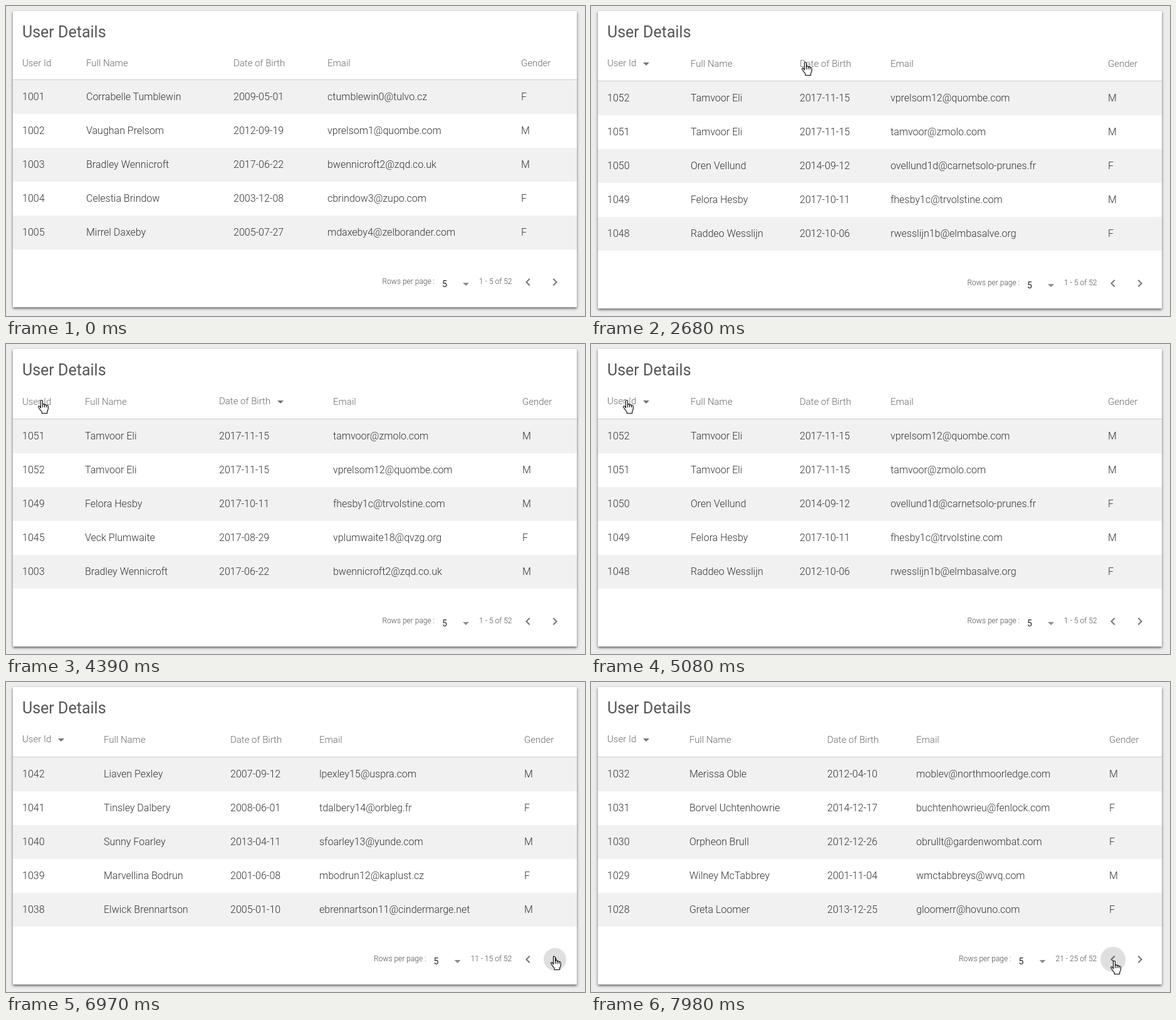
Animation of 924 by 494 pixels, one loop 8 s. Source, as an HTML page:

```html
<!DOCTYPE html>
<html lang="en">
<head>
<meta charset="utf-8">
<title>User Details</title>
<style>
  html, body { margin: 0; width: 100%; height: 100%; overflow: hidden; background: #ececec; }
  #card { position: absolute; left: 11px; top: 8px; width: 900px; background: #fff;
    box-shadow: 0 2px 4px rgba(0,0,0,.6); }
  svg { position: absolute; left: 0; top: 0; display: block; }
  text { font-family: Roboto, Arial, sans-serif; font-weight: 300; white-space: pre; }
  .title { font-size: 25px; font-weight: 400; fill: #555; }
  .head { font-size: 15px; fill: #6a6a6a; }
  .cell { font-size: 16px; fill: #333; }
  .foot { font-size: 12px; fill: #4c4c4c; }
  .size { font-size: 14px; font-weight: 400; fill: #222; }
  .icon { fill: #757575; }
  .drop { fill: #8c8c8c; }
  .cursor { fill: #fff; stroke: #000; stroke-width: 1.1; stroke-linejoin: round; }
</style>
</head>
<body>
<div id="card"></div>
<svg id="stage" width="924" height="494" viewBox="0 0 924 494"></svg>
<script>
const LOOP = 8000;
const stage = document.getElementById('stage');
const card = document.getElementById('card');

function set(node, attrs) {
  for (const key in attrs) node.setAttribute(key, attrs[key]);
}
function add(tag, attrs, parent = stage) {
  const node = document.createElementNS('http://www.w3.org/2000/svg', tag);
  set(node, attrs);
  return parent.appendChild(node);
}
function show(node, visible) {
  node.style.display = visible ? '' : 'none';
}
function label(cls, x, y, text, parent) {
  const node = add('text', { class: cls, x, y }, parent);
  node.textContent = text;
  return node;
}
function write(node, x, y, text) {
  set(node, { x, y });
  if (node.textContent !== text) node.textContent = text;
}

// name | date of birth | mail domain | gender | mail user, if not built from the name
const users = {
  1001: 'Corrabelle Tumblewin|2009-05-01|tulvo.cz|F',
  1002: 'Vaughan Prelsom|2012-09-19|quombe.com|M',
  1003: 'Bradley Wennicroft|2017-06-22|zqd.co.uk|M',
  1004: 'Celestia Brindow|2003-12-08|zupo.com|F',
  1005: 'Mirrel Daxeby|2005-07-27|zelborander.com|F',
  1014: 'Torvin Ashmell|2000-02-13|brindlo.org|M',
  1021: 'Pellina Crowdest|2001-03-17|wexlode.com|F',
  1023: 'Harvick Osmey|2008-10-02|tarnbel.com|M',
  1024: 'Lunetta Prask|2015-04-23|quorvine.net|F',
  1025: 'Fenwell Garbry|2004-01-19|mosdale.org|M',
  1026: 'Ottiline Weyburst|2011-08-30|plovander.com|F',
  1027: 'Jorrick Tansome|2016-05-11|elkvane.com|M',
  1028: 'Greta Loomer|2013-12-25|hovuno.com|F',
  1029: 'Wilney McTabbrey|2001-11-04|wvq.com|M',
  1030: 'Orpheon Brull|2012-12-26|gardenwombat.com|F',
  1031: 'Borvel Uchtenhowrie|2014-12-17|fenlock.com|F',
  1032: 'Merissa Oble|2012-04-10|northmoorledge.com|M',
  1033: 'Dorvan Hislewick|2010-03-05|umberlo.com|M',
  1034: 'Sabrille Tenning|2006-11-21|cravenol.net|F',
  1035: 'Nolvin Arkhurst|2014-07-16|pelstow.org|M',
  1036: 'Willamina Drosk|2009-09-09|varnquist.com|F',
  1037: 'Emmerel Fosby|2000-09-28|jundlow.com|F',
  1038: 'Elwick Brennartson|2005-01-10|cindermarge.net|M',
  1039: 'Marvellina Bodrun|2001-06-08|kaplust.cz|F',
  1040: 'Sunny Foarley|2013-04-11|yunde.com|M',
  1041: 'Tinsley Dalbery|2008-06-01|orbleg.fr|F',
  1042: 'Liaven Pexley|2007-09-12|uspra.com|M',
  1043: 'Corwin Ballisk|2011-02-14|hestrow.com|M',
  1044: 'Annelby Trufold|2006-08-07|mirvane.org|F',
  1045: 'Veck Plumwaite|2017-08-29|qvzg.org|F',
  1046: 'Rosmund Ackerly|2010-12-03|dorlunde.com|M',
  1047: 'Isolde Farnwick|2015-05-20|plenqua.net|F',
  1048: 'Raddeo Wesslijn|2012-10-06|elmbasalve.org|F',
  1049: 'Felora Hesby|2017-10-11|trvolstine.com|M',
  1050: 'Oren Vellund|2014-09-12|carnetsolo-prunes.fr|F',
  1051: 'Tamvoor Eli|2017-11-15|zmolo.com|M|tamvoor',
  1052: 'Tamvoor Eli|2017-11-15|quombe.com|M|vprelsom12'
};

function rowOf(id) {
  const [name, born, domain, gender, user] = users[id].split('|');
  const [first, last] = name.toLowerCase().split(' ');
  const account = user || first[0] + last + (id - 1001).toString(36);
  return [String(id), name, born, account + '@' + domain, gender];
}
const run = (from, step) => Array.from({ length: 5 }, (_, i) => from + i * step);

// sort: [column, direction]; cols: left edges of the last four columns
const byIdUp = { ids: run(1001, 1), cols: [158, 384, 528, 825], sort: [0, 1] };
const byIdDown = { ids: run(1052, -1), cols: [159, 333, 478, 825], sort: [0, -1] };
const page = (n, cols) => ({ ids: run(1057 - 5 * n, -1), cols, sort: [0, -1], page: n });
const page5 = page(5, [157, 377, 519, 827]);

const views = [
  [0, { ids: run(1001, 1), cols: [128, 363, 513, 822] }],
  [1160, byIdUp],
  [1820, byIdDown],
  [2910, { ids: [1014, 1037, 1021, 1039, 1029], cols: [126, 345, 525, 824], sort: [2, 1] }],
  [3590, { ids: [1051, 1052, 1049, 1045, 1003], cols: [126, 340, 522, 824], sort: [2, -1] }],
  [4570, byIdUp],
  [5040, byIdDown],
  [6300, page(2, [157, 354, 498, 826])],
  [6600, page(3, [156, 358, 500, 827])],
  [7020, page(4, [157, 362, 505, 827])],
  [7220, page5],
  [7400, page(6, [157, 370, 512, 828])],
  [7960, page5]
];

// time, x, y of the pointer tip
const track = [
  [210, 155, 302], [330, 104, 188], [470, 46, 62], [560, 32, 20], [700, 57, 93],
  [1880, 57, 93], [2040, 140, 97], [2280, 308, 92], [2420, 308, 92], [2450, 325, 91],
  [2640, 325, 91], [2680, 342, 89], [3050, 342, 89], [3080, 347, 89],
  [3990, 347, 89], [4190, 190, 97], [4390, 57, 89],
  [5400, 57, 89], [5600, 240, 165], [5900, 690, 360], [6130, 875, 437],
  [7440, 875, 437], [7570, 835, 444]
];

// time, button (0 none, 1 previous, 2 next), radius
const ripples = [
  [0, 0, 0], [6220, 2, 9], [6260, 2, 14], [6300, 2, 18], [6340, 2, 20],
  [6570, 2, 18], [6600, 2, 20], [6790, 2, 17], [6970, 2, 18], [7020, 2, 20],
  [7180, 2, 18], [7220, 2, 20], [7480, 0, 0], [7930, 1, 16], [7960, 1, 20]
];

const last = (list, t) => list.filter(item => item[0] <= t).pop();

function pointerAt(t) {
  const from = last(track, t);
  const to = track[track.indexOf(from) + 1] || from;
  const k = to === from ? 0 : (t - from[0]) / (to[0] - from[0]);
  return [1, 2].map(i => from[i] + (to[i] - from[i]) * k);
}

label('title', 26, 50, 'User Details');
const body = add('g', {});
add('rect', { x: 11, y: 117, width: 900, height: 1, fill: '#ccc' }, body);
for (const i of [0, 2, 4])
  add('rect', { x: 11, y: 118 + 54 * i, width: 900, height: 54, fill: '#f1f1f1' }, body);

const titles = ['User Id', 'Full Name', 'Date of Birth', 'Email', 'Gender'];
const heads = titles.map(text => label('head', 0, 0, text));
const cells = run(0, 1).map(r => titles.map(() => label('cell', 0, 150 + 54 * r, '', body)));
const sortIcon = add('path', { class: 'icon' });

const footer = add('g', {}, body);
const sizeBox = add('g', {}, footer);
label('foot', 600.5, 443, 'Rows per page :', sizeBox);
label('size', 696, 448, '5', sizeBox);
add('path', { class: 'drop', d: 'M729 441h10l-5 5z' }, sizeBox);
const range = label('foot', 755, 443, '', footer);
add('path', { class: 'icon', transform: 'translate(821 428)',
  d: 'M15.41 7.41L14 6l-6 6 6 6 1.41-1.41L10.83 12z' }, footer);
add('path', { class: 'icon', transform: 'translate(864 428)',
  d: 'M10 6L8.59 7.41 13.17 12l-4.58 4.59L10 18l6-6z' }, footer);
const ripple = add('circle', { cy: 442, fill: '#000', 'fill-opacity': .125 });

const arrow = add('path', { class: 'cursor',
  d: 'M.5.5V16.5L4.2 13 6.6 18.8 9 17.8 6.7 12.2H11.6z' });
const hand = add('g', { class: 'cursor' });
add('path', { d: 'M4.5 13V2a1.5 1.5 0 0 1 3 0V8a1.5 1.5 0 0 1 3 .3V9a1.5 1.5 0 0 1 3 .3V10' +
  'a1.4 1.4 0 0 1 2.8.4V15l-1.6 3.5v3H6.2V19L2.8 14.8.8 11.8Q.4 10 2 9.8 3.3 10 4.5 13z' }, hand);
add('path', { d: 'M7.5 8v4M10.5 9v3M13.5 10v2', fill: 'none' }, hand);

function drawTable(view) {
  const shift = view.sort ? 2 : 0;
  const xs = [26, ...view.cols];
  const sorted = view.sort ? view.sort[0] : -1;
  card.style.height = 472 + shift + 'px';
  set(body, { transform: `translate(0 ${shift})` });
  heads.forEach((node, c) => set(node, { x: xs[c], y: shift && c !== sorted ? 97 : 96 }));
  view.ids.forEach((id, r) => rowOf(id).forEach((text, c) =>
    write(cells[r][c], xs[c], 150 + 54 * r, text)));

  show(sortIcon, view.sort);
  if (view.sort) {
    const x = xs[sorted] + (sorted ? 93 : 57);
    set(sortIcon, { d: view.sort[1] > 0 ? `M${x} 94l5-5 5 5z` : `M${x} 90l5 5 5-5z` });
  }

  const n = view.page || 1;
  const wide = n === 1 ? 0 : n === 2 ? 6.7 : 13.5;
  set(sizeBox, { transform: `translate(${-wide} 0)` });
  write(range, 755 - wide, 443, `${5 * n - 4} - ${5 * n} of 52`);
}

function drawPointer(t, view) {
  show(arrow, false);
  show(hand, false);
  if (t < track[0][0]) return;
  const [x, y] = pointerAt(t).map(Math.round);
  const over = (left, width) => x >= left && x <= left + width && y > 80 && y < 103;
  const onButton = [833, 876].some(cx => Math.hypot(x - cx, y - 442) < 20);
  const clickable = over(26, 70) || over(view.cols[1], 82) || onButton;
  const node = clickable ? hand : arrow;
  set(node, { transform: `translate(${clickable ? x - 6 : x} ${y})` });
  show(node, true);
}

let current;
function draw(t) {
  const view = last(views, t)[1];
  if (view !== current) drawTable(current = view);
  const [, button, r] = last(ripples, t);
  set(ripple, { cx: button === 1 ? 833 : 876, r });
  drawPointer(t, view);
}

const start = performance.now();
function tick() {
  draw((performance.now() - start) % LOOP);
  requestAnimationFrame(tick);
}
tick();
</script>
</body>
</html>
```
